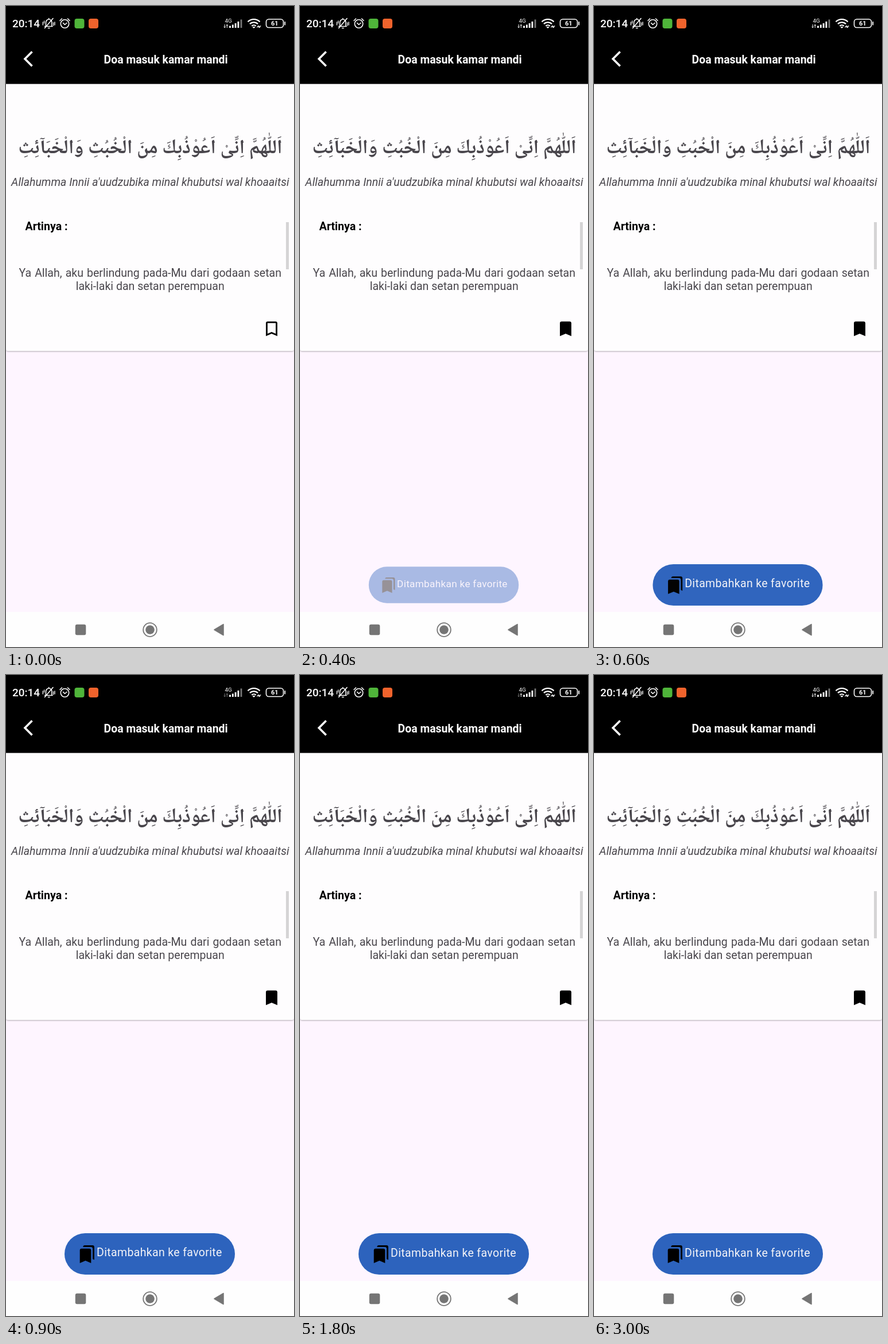
An HTML page that plays this animation: 502x1115 px, repeating every 3.1 s.

```html
<!DOCTYPE html>
<html lang="id">
<head>
<meta charset="utf-8">
<title>Doa masuk kamar mandi</title>
<style>
html, body { margin: 0; width: 100%; height: 100%; overflow: hidden; background: #fef5ff; }
#stage { position: relative; width: 502px; height: 1115px; overflow: hidden; }
svg { position: absolute; left: 0; top: 0; }
text, p { font-family: Roboto, sans-serif; font-size: 19.54px; }
.bold { font-weight: 700; }
.ink { fill: #49464c; }
.arab { font-family: "Noto Naskh Arabic", "Noto Naskh Arabic UI", "Noto Sans Arabic", "DejaVu Sans", sans-serif; font-size: 34.2px; }
.line { fill: none; stroke: #fff; }
#meaning {
  position: absolute; left: 22.4px; top: 454px; width: 457.6px; margin: 0;
  line-height: 22.9px; color: #49464c; text-align: justify; text-align-last: center;
}
#meaning span { white-space: nowrap; }
</style>
</head>
<body>
<div id="stage">
<svg width="502" height="1115" viewBox="0 0 502 1115">
  <defs>
    <filter id="shade" x="-5%" y="-5%" width="110%" height="110%">
      <feDropShadow dx="0" dy="1.2" stdDeviation="1.2" flood-color="#000" flood-opacity=".28"/>
    </filter>
  </defs>
  <rect width="502" height="1115" fill="#fef5ff"/>
  <rect y="120" width="502" height="480" rx="4" fill="#fefdfe" filter="url(#shade)"/>
  <rect width="502" height="135.600" fill="#000"/>
  <rect y="1054" width="502" height="61" fill="#fefefe"/>

  <!-- status bar -->
  <text x="11" y="37.300" fill="#fff" font-weight="500" style="font-size:18.900px">20:14</text>
  <g class="line" stroke-width="1.600" stroke-linecap="round" stroke-linejoin="round">
    <path d="M67.500 35.500H81M69.500 35V28.500a5.200 5.200 0 0 1 10.400 0V35M74.700 21.500v1M73.500 38.500h2.500M67.500 38.500 82 21.500"/>
    <path d="M64.300 28v5M66.600 26v4M82.700 29v5M85 28v5" stroke-width="1.300"/>
    <circle cx="102.500" cy="31" r="7.200"/>
    <path d="M99.500 29.500 102.500 32.500 106 29.500M94 25.500 97.500 22M111 25.500 107.500 22"/>
  </g>
  <rect x="119.500" y="22" width="17" height="17" rx="4" fill="#4fb53a"/>
  <rect x="144" y="22" width="17" height="17" rx="4" fill="#f1632c"/>
  <text x="381.500" y="29" fill="#fff" style="font-size:9.800px">4G</text>
  <path id="down" d="M381.200 32v5.500M379.700 35.800l1.500 2 1.500-2" class="line"/>
  <path id="up" d="M385.300 38v-5.500M383.800 34.200l1.500-2 1.500 2" class="line"/>
  <path d="M390.500 38v-3.500M395.300 38v-5.500M400.100 38v-8M404.900 38v-11" class="line" stroke-width="2.800"/>
  <path d="M410 38V23.500" stroke="#777" stroke-width="2.800"/>
  <g class="line" stroke-width="2.300">
    <path d="M421.500 27.500a15 15 0 0 1 21 0M425 31.300a10 10 0 0 1 14 0M428.300 34.800a5.300 5.300 0 0 1 7.400 0"/>
    <path d="M430 36.500 432 38.500 434 36.500Z" fill="#fff" stroke-width="1"/>
    <path d="M437.500 37.500l1.500-2.500a1.500 1.500 0 0 1 2.500 1.500M444 34l-1.500 2.800a1.500 1.500 0 0 1-2.500-1.500" stroke-width="1.200"/>
  </g>
  <rect x="453.500" y="23" width="30" height="14.500" rx="4.500" class="line" stroke-width="1.600"/>
  <path d="M486.200 28v4.500" class="line" stroke-width="1.800" stroke-linecap="round"/>
  <text x="468.300" y="34.300" fill="#fff" text-anchor="middle" class="bold" style="font-size:11px">61</text>

  <!-- title bar -->
  <path d="M45.500 79.500 33 92 45.500 104.500" class="line" stroke-width="3.600"/>
  <text x="278.600" y="99.500" fill="#fff" text-anchor="middle" class="bold" style="font-size:19.400px">Doa masuk kamar mandi</text>

  <!-- card -->
  <text x="251.500" y="256" text-anchor="middle" direction="rtl" lang="ar" class="ink arab bold">اَللّٰهُمَّ اِنِّىْ اَعُوْذُبِكَ مِنَ الْخُبُثِ وَالْخَبَآئِثِ</text>
  <text x="251.300" y="313" text-anchor="middle" font-style="italic" class="ink">Allahumma Innii a'uudzubika minal khubutsi wal khoaaitsi</text>
  <text x="33.500" y="389.500" class="bold">Artinya :</text>
  <rect x="488" y="376" width="5" height="82" fill="#d5d4d5"/>
  <path id="mark" transform="translate(445.900 544.400) scale(1.425)"/>

  <!-- navigation -->
  <g fill="#757575">
    <rect x="120.800" y="1075.800" width="18.500" height="18.500" rx="3"/>
    <circle cx="251" cy="1085" r="7.800"/>
    <circle cx="251" cy="1085" r="11.800" fill="none" stroke="#757575" stroke-width="1.800"/>
    <path d="M363 1085 379 1075.500V1094.500Z" stroke="#757575" stroke-width="1.500" stroke-linejoin="round"/>
  </g>

  <g id="toast">
    <rect x="102" y="971" width="297" height="72" rx="36" fill="#2d63bd"/>
    <path transform="translate(124.500 990.700) scale(1.400)" d="M19 18l2 1V3c0-1.100-.9-2-2-2H8.990C7.890 1 7 1.900 7 3h10c1.100 0 2 .9 2 2v13zM15 5H5c-1.100 0-2 .9-2 2v16l7-3 7 3V7c0-1.100-.9-2-2-2z"/>
    <text x="158" y="1011.500" fill="#f4f4f8" letter-spacing=".348">Ditambahkan ke favorite</text>
  </g>
</svg>
<p id="meaning">Ya Allah, aku berlindung pada-Mu dari godaan setan <span>laki-laki</span> dan setan perempuan</p>
</div>
<script>
const LOOP = 3100, STEP = 100, TAP = 300, SHOW = 343;
const [mark, toast, down, up] = ['mark', 'toast', 'down', 'up'].map(id => document.getElementById(id));
const FULL = 'M17 3H7c-1.100 0-2 .9-2 2v16l7-3 7 3V5c0-1.100-.9-2-2-2z';
const OUTLINE = FULL + 'm0 15l-5-2.180L7 18V5h10v13z';

// Critically damped spring from 0 to 1
function spring(ms) {
  const x = Math.max(0, ms) * 0.0242;
  return 1 - (1 + x) * Math.exp(-x);
}

function light(arrow, on) {
  arrow.style.stroke = on ? '#fff' : '#777';
}

function draw(t) {
  const p = spring(t - SHOW), s = 0.8 + 0.2 * p;
  mark.setAttribute('d', t < TAP ? OUTLINE : FULL);
  toast.setAttribute('opacity', p);
  toast.setAttribute('transform', `translate(250.5 1007) scale(${s}) translate(-250.5 -1007)`);
  light(down, t < 700 || t >= 2800);
  light(up, t < 700 || t >= 1800);
}

const start = performance.now();
function tick() {
  const t = (performance.now() - start) % LOOP;
  draw(Math.floor(t / STEP) * STEP);
  requestAnimationFrame(tick);
}
tick();
</script>
</body>
</html>
```
